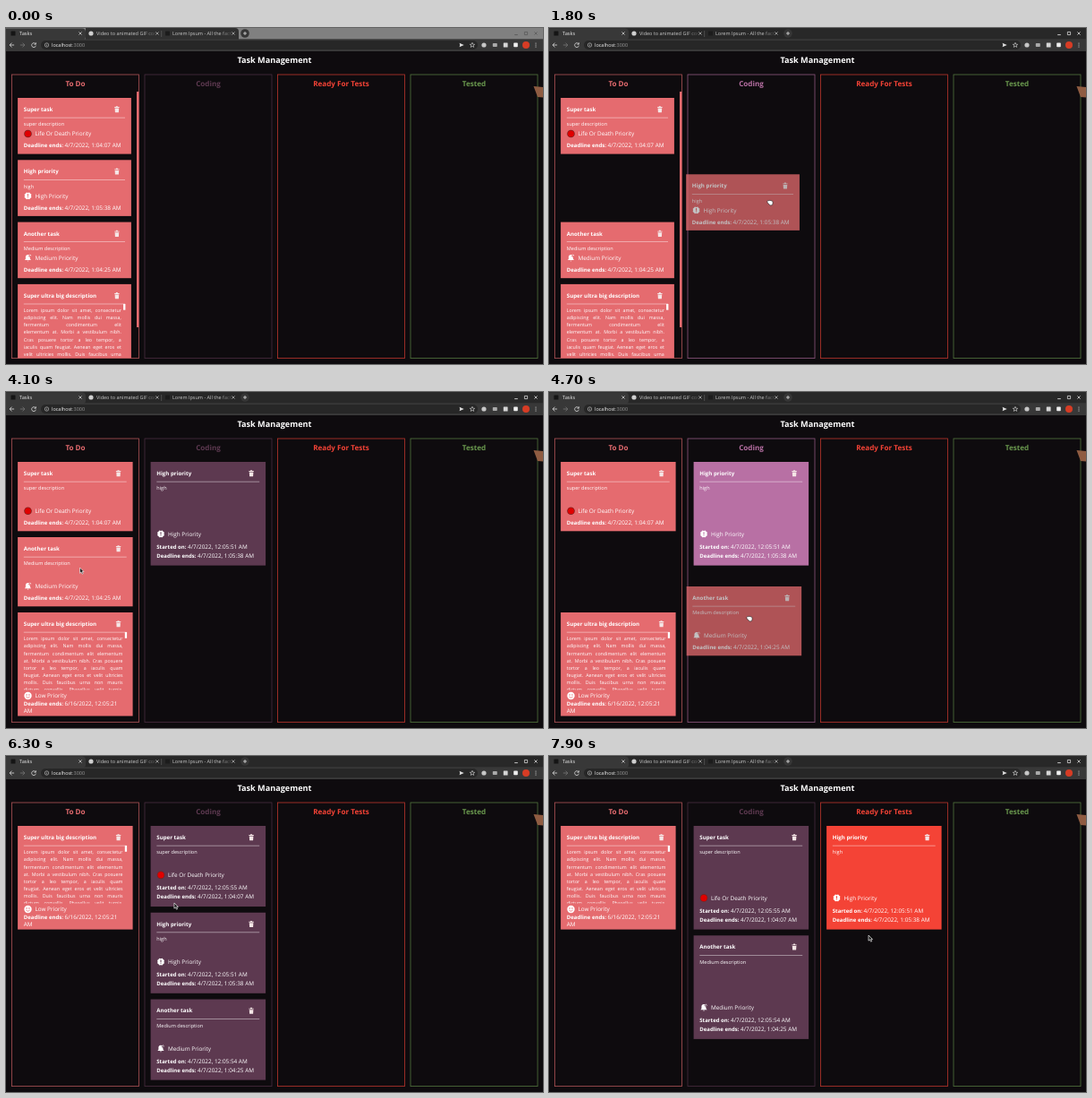
Recreate the animation shown at these times as an HTML page with a canvas. Size 600 by 375 pixels, loop 8 s.

```html
<!DOCTYPE html>
<html lang="en">
<head>
<meta charset="utf-8">
<title>Task Management</title>
<style>
html, body { margin: 0; width: 100%; height: 100%; overflow: hidden; background: #0e0b0e; }
canvas { display: block; width: 600px; height: 375px; }
</style>
</head>
<body>
<canvas id="stage"></canvas>
<script>
const LOOP = 8000, BG = '#0e0b0e', DIM = '#5d3950';
const FONT = '"Open Sans", "Noto Sans", sans-serif';
const dpr = window.devicePixelRatio || 1;

function setup(canvas) {
  canvas.width = 600 * dpr;
  canvas.height = 375 * dpr;
  const ctx = canvas.getContext('2d');
  ctx.scale(dpr, dpr);
  ctx.textRendering = 'geometricPrecision';
  return ctx;
}
const main = setup(document.getElementById('stage'));
const layer = setup(document.createElement('canvas'));
let g = main;

const columns = [
  { name: 'To Do', x: 6.5, color: '#e56b6f' },
  { name: 'Coding', x: 155, color: '#b870a4' },
  { name: 'Ready For Tests', x: 303.5, color: '#f44336' },
  { name: 'Tested', x: 452, color: '#6a994e' }
];

const cards = {
  S: { title: 'Super task', text: 'super description', level: 'Life Or Death', end: '4/7/2022, 1:04:07 AM', start: '55' },
  H: { title: 'High priority', text: 'high', level: 'High', end: '4/7/2022, 1:05:38 AM', start: '51' },
  A: { title: 'Another task', text: 'Medium description', level: 'Medium', end: '4/7/2022, 1:04:25 AM', start: '54' },
  L: { title: 'Super ultra big description', level: 'Low', end: '6/16/2022, 12:05:21' }
};

const narrowLines = [
  'Lorem ipsum dolor sit amet, consectetur', 'adipiscing elit. Nam mollis dui massa,',
  'fermentum condimentum elit', 'elementum at. Morbi a vestibulum nibh.',
  'Cras posuere tortor a leo tempor, a', 'iaculis quam feugiat. Aenean eget eros et',
  'velit ultricies mollis. Duis faucibus urna'
];
const wideLines = [
  'Lorem ipsum dolor sit amet, consectetur', 'adipiscing elit. Nam mollis dui massa,',
  'fermentum condimentum elit elementum', 'at. Morbi a vestibulum nibh. Cras posuere',
  'tortor a leo tempor, a iaculis quam', 'feugiat. Aenean eget eros et velit ultricies',
  'mollis. Duis faucibus urna non mauris', 'dictum convallis. Phasellus velit turpis,'
];

// Board contents from each time on, one string of cards per column
const boards = [
  [0, 'SHAL', '', ''], [2100, 'SAL', 'H', ''], [5050, 'SL', 'HA', ''],
  [6000, 'L', 'SHA', ''], [7650, 'L', 'SA', 'H']
];
// Start, end, card, source column
const drags = [[1350, 2100, 'H', 0], [4250, 5050, 'A', 0], [5550, 6000, 'S', 0], [7150, 7650, 'H', 1]];
const path = [
  [1000, 106, 178], [1350, 106, 178], [1800, 246, 194], [2100, 256, 190],
  [2900, 76, 124], [4000, 82.5, 197], [4250, 82.5, 197], [4700, 223, 252],
  [5050, 232, 250], [5400, 118.5, 163], [5550, 118.5, 163], [5700, 130, 166.5],
  [6000, 156, 146], [7000, 262, 209], [7150, 262, 209], [7200, 291, 214],
  [7650, 356, 205], [7900, 357, 201], [8000, 357, 201]
];

function pointerAt(t) {
  const i = Math.max(1, path.findIndex(p => p[0] >= t));
  const [t0, x0, y0] = path[i - 1], [t1, x1, y1] = path[i];
  const k = Math.max(0, (t - t0) / (t1 - t0));
  return { x: x0 + (x1 - x0) * k, y: y0 + (y1 - y0) * k };
}

function rect(x, y, w, h, color) {
  g.fillStyle = color;
  g.fillRect(x, y, w, h);
}
function dot(x, y, r, color) {
  g.fillStyle = color;
  g.beginPath();
  g.arc(x, y, r, 0, 7);
  g.fill();
}
function pill(x, y, w, h, r, color) {
  g.fillStyle = color;
  g.beginPath();
  g.roundRect(x, y, w, h, r);
  g.fill();
}
function shape(d, x, y, fill, stroke, width = 0.8) {
  const p = new Path2D(d);
  g.save();
  g.translate(x, y);
  if (fill) { g.fillStyle = fill; g.fill(p); }
  if (stroke) { g.strokeStyle = stroke; g.lineWidth = width; g.stroke(p); }
  g.restore();
}
// Returns the x where the text ends
function text(str, x, y, size, color = '#fff', bold = false, align = 'left') {
  g.font = `${bold ? 'bold ' : ''}${size}px ${FONT}`;
  g.fillStyle = color;
  g.textAlign = align;
  g.fillText(str, x, y);
  return x + g.measureText(str).width;
}
function justify(line, x, y, width, size) {
  g.font = `${size}px ${FONT}`;
  const words = line.split(' ');
  const used = words.reduce((sum, w) => sum + g.measureText(w).width, 0);
  const gap = (width - used) / (words.length - 1);
  for (const w of words) x = text(w, x, y, size) + gap;
}

function trash(x, y) {
  shape('M-2.7-1.6H2.7V-2.5H1.2L.6-3.4H-.8L-1.3-2.5H-2.7Z M-2.3-1H2.3L2 3.7H-2Z', x, y, '#f5e6e6');
}

function levelIcon(level, x, y, color) {
  if (level === 'Life Or Death') {
    dot(x, y, 4.3, '#7d2020');
    dot(x, y, 3.5, '#e00000');
  } else if (level === 'High') {
    shape('M-1.6-3.9L0-3.4 1.6-3.9 2.6-2.6 3.9-1.6 3.5 0 3.9 1.6 2.6 2.6 1.6 3.9 0 3.5-1.6 3.9-2.6 2.6-3.9 1.6-3.5 0-3.9-1.6-2.6-2.6Z', x, y, '#fff');
    rect(x - 0.5, y - 2.2, 1, 2.7, color);
    rect(x - 0.5, y + 1.1, 1, 1, color);
  } else if (level === 'Medium') {
    shape('M-3.7 2.5L-2.6 1.3V-.8C-2.6-2.6-1.5-3.6 0-3.6C1.6-3.6 2.5-2.4 2.5-.8V1.3L3.7 2.5ZM-1 3.1H1L0 4Z', x, y, '#fff');
    shape('M.6-2.6L3.4.2M3.5-3.4L2 -1.8', x, y, null, color, 0.8);
    shape('M2.2-3.7L3.6-2.4', x, y, null, '#fff', 0.9);
  } else {
    dot(x, y, 4.2, '#fff');
    dot(x - 1.4, y - 1, 0.7, color);
    dot(x + 1.4, y - 1, 0.7, color);
    shape('M-2 1.1Q0 3.5 2 1.1', x, y, null, color);
  }
}

function dateLine(label, value, x, y) {
  text(value, text(label, x, y, 6, '#fff', true) + 1.6, y, 6.4);
}

function drawCard(key, box, color, started) {
  const { x, y, w, h } = box, card = cards[key], left = x + 6.7, bottom = y + h;
  rect(x, y, w, h, color);
  text(card.title, left, y + 14.9, 6.15, '#fff', true);
  trash(x + w - 16, y + 12.6);
  rect(left, y + 21.8, w - 13.6, 0.6, 'rgba(255,255,255,.7)');

  if (card.text) {
    text(card.text, left, y + 31.4, 5.55);
  } else {
    g.save();
    g.beginPath();
    g.rect(x, y + 22, w, 64.5);
    g.clip();
    const lines = w < 128 ? narrowLines : wideLines;
    lines.forEach((line, i) => justify(line, left, y + 31.4 + i * 8.05, w - 17.8, 5.3));
    rect(x + w - 8.8, y + 21.8, 2.3, 7, '#fff');
    g.restore();
  }

  const rowY = bottom - (started ? 35.2 : 22.6);
  levelIcon(card.level, x + 11.4, rowY, color);
  text(card.level + ' Priority', x + 19.3, rowY + 2.3, 6.4);
  if (started) {
    dateLine('Started on:', `4/7/2022, 12:05:${card.start} AM`, left, bottom - 18.8);
    dateLine('Deadline ends:', card.end, left, bottom - 9);
  } else if (card.text) {
    dateLine('Deadline ends:', card.end, left, bottom - 7.3);
  } else {
    dateLine('Deadline ends:', card.end, left, bottom - 11.3);
    text('AM', left, bottom - 3.8, 6.4);
  }
}

// Cards share the column height; the long one keeps its full height
function layout(keys, column) {
  const n = keys.length, long = keys.includes('L') ? 1 : 0, full = 115.6, gap = 6.7;
  const share = (283.6 - gap * (n - 1) - long * full) / (n - long);
  const boxes = {};
  let y = 78;
  for (const key of keys) {
    const h = key === 'L' ? full : Math.min(full, Math.max(62.6, share));
    boxes[key] = { x: column.x + 6.6, y, w: n > 3 ? 126.8 : 128.5, h };
    y += h + gap;
  }
  return boxes;
}

function tabTitle(str, x, color) {
  const fade = g.createLinearGradient(x + 52, 0, x + 69, 0);
  fade.addColorStop(0, color);
  fade.addColorStop(1, 'rgba(190,190,190,0)');
  text(str, x, 8.3, 5.5, fade);
}
function cross(x, y, color) {
  shape('M-1.6-1.6L1.6 1.6M1.6-1.6L-1.6 1.6', x, y, null, color, 0.7);
}

function drawBrowser(focused) {
  const ink = '#dedede';
  rect(0, 0, 600, 13, focused ? '#282828' : '#808080');
  pill(89, 0, 171, 13, [0, 4, 0, 0], focused ? '#282828' : '#303030');
  pill(-4, 0.5, 93, 13, 4, '#383838');
  rect(0, 12.3, 600, 13.7, '#383838');
  rect(173.5, 3, 0.6, 7, '#666');

  pill(5.5, 3.5, 5, 5, 0.5, '#151515');
  text('Tasks', 15, 8.3, 5.7, '#e6e6e6');
  cross(83, 6, ink);
  dot(95, 6, 2.6, '#cfcfcf');
  tabTitle('Video to animated GIF converter', 101, '#c8c8c8');
  cross(169, 6, '#bbb');
  pill(178, 3.5, 5, 5, 0.5, '#1c1c1c');
  tabTitle('Lorem Ipsum - All the facts', 186, '#c8c8c8');
  cross(254, 6, '#bbb');
  dot(267, 6, 4.8, '#363636');
  shape('M-2 0H2M0-2V2', 267, 6, null, ink);

  const control = focused ? '#eee' : '#555';
  shape('M-1.8 1.6H1.8', 570, 6, null, control);
  shape('M-1.6-1.6H1.6V1.6H-1.6Z', 581, 6, null, control, 0.7);
  cross(592, 6, control);

  shape('M2.6 0H-2.4M0-2.4L-2.4 0 0 2.4', 6.5, 19, null, ink);
  shape('M-2.6 0H2.4M0-2.4L2.4 0 0 2.4', 18.5, 19, null, '#777');
  shape('M2-1.3A2.4 2.4 0 1 0 2.4.7M2.4-2.7V-.8H.5', 31, 19, null, ink);
  pill(39, 14, 488, 10, 5, '#272727');
  shape('M2.2 0A2.2 2.2 0 1 1-2.2 0A2.2 2.2 0 1 1 2.2 0M0-.3V1.2M0-1.2V-.7', 45.5, 19, null, '#ccc', 0.6);
  text(':3000', text('localhost', 51, 21, 5.5, '#f0f0f0'), 21, 5.5, '#999');
  shape('M-2.4-2.2L2.7 0-2.4 2.2-1.8 0Z', 509, 19, ink);
  shape('M0-2.7L.8-.8 2.7-.7 1.2.5 1.7 2.4 0 1.3-1.7 2.4-1.2.5-2.7-.7-.8-.8Z', 521, 19, null, ink, 0.6);
  dot(534, 19, 2.6, '#c7c7c7');
  pill(543.8, 17, 5, 4, 0.8, '#aaa');
  pill(555.8, 16.6, 4.8, 4.8, 0.5, '#d5d5d5');
  pill(567.2, 16.6, 4.6, 4.6, 0.8, '#eee');
  dot(581, 19, 4, '#d63c25');
  for (const y of [17, 19, 21]) dot(592, y, 0.6, ink);
}

function drawColumn(column, color) {
  g.globalAlpha = 0.75;
  g.strokeStyle = color;
  g.lineWidth = 0.8;
  g.strokeRect(column.x, 52, 142, 316.6);
  g.globalAlpha = 1;
  text(column.name, column.x + 71, 65, 8.1, color, true, 'center');
}

function drawPointer(p, holding) {
  if (holding) {
    shape('M-3-1.6Q-2.6-3-1.2-2.3Q0-3.2 1-2.2Q2.5-2.6 3-1V1Q3 3 .8 3Q-.8 3-1.6 1L-3 .2Z', p.x + 1, p.y + 1, '#fff', '#222', 0.6);
  } else {
    shape('M0 0V6.2L1.5 4.9 2.6 7.2 3.7 6.7 2.7 4.5H4.5Z', p.x, p.y - 1, '#1c1c1c', '#e8e8e8', 0.7);
  }
}

function draw(t) {
  const board = boards.filter(b => b[0] <= t).pop().slice(1);
  const drag = drags.find(d => t >= d[0] && t < d[1]);
  const p = pointerAt(t);
  const over = drag && drag[3] === 0 && p.x > 160 && p.x < 297;

  rect(0, 0, 600, 375, BG);
  drawBrowser(t >= 1350);
  text('Task Management', 300, 39.2, 9.15, '#fff', true, 'center');

  columns.forEach((column, i) => {
    const color = i === 1 && !over ? DIM : column.color;
    drawColumn(column, color);
    const keys = board[i] || '';
    const boxes = layout(keys, column);
    g.save();
    g.beginPath();
    g.rect(column.x, 52, 142, 316.4);
    g.clip();
    for (const key of keys) {
      const lifted = drag && drag[2] === key && t > drag[0] + 70;
      if (!lifted) drawCard(key, boxes[key], color, i > 0);
    }
    if (keys.length > 3) rect(146, 71, 2.5, 263, column.color);
    g.restore();
  });

  shape('M0 0L11 1V12.5L4.5 12Z', 589.5, 65, '#8f5c42');

  if (drag) {
    const [start, , key, from] = drag, grab = pointerAt(start);
    const box = layout(board[from], columns[from])[key];
    box.x += p.x - grab.x;
    box.y += p.y - grab.y;
    g = layer;
    g.clearRect(0, 0, 600, 375);
    drawCard(key, box, from ? DIM : columns[0].color, from > 0);
    g = main;
    g.globalAlpha = 0.75;
    g.drawImage(layer.canvas, 0, 0, 600, 375);
    g.globalAlpha = 1;
  }
  if (t >= 1000) drawPointer(p, drag);
}

const began = performance.now();
function tick() {
  draw((performance.now() - began) % LOOP);
  requestAnimationFrame(tick);
}
tick();
</script>
</body>
</html>
```
